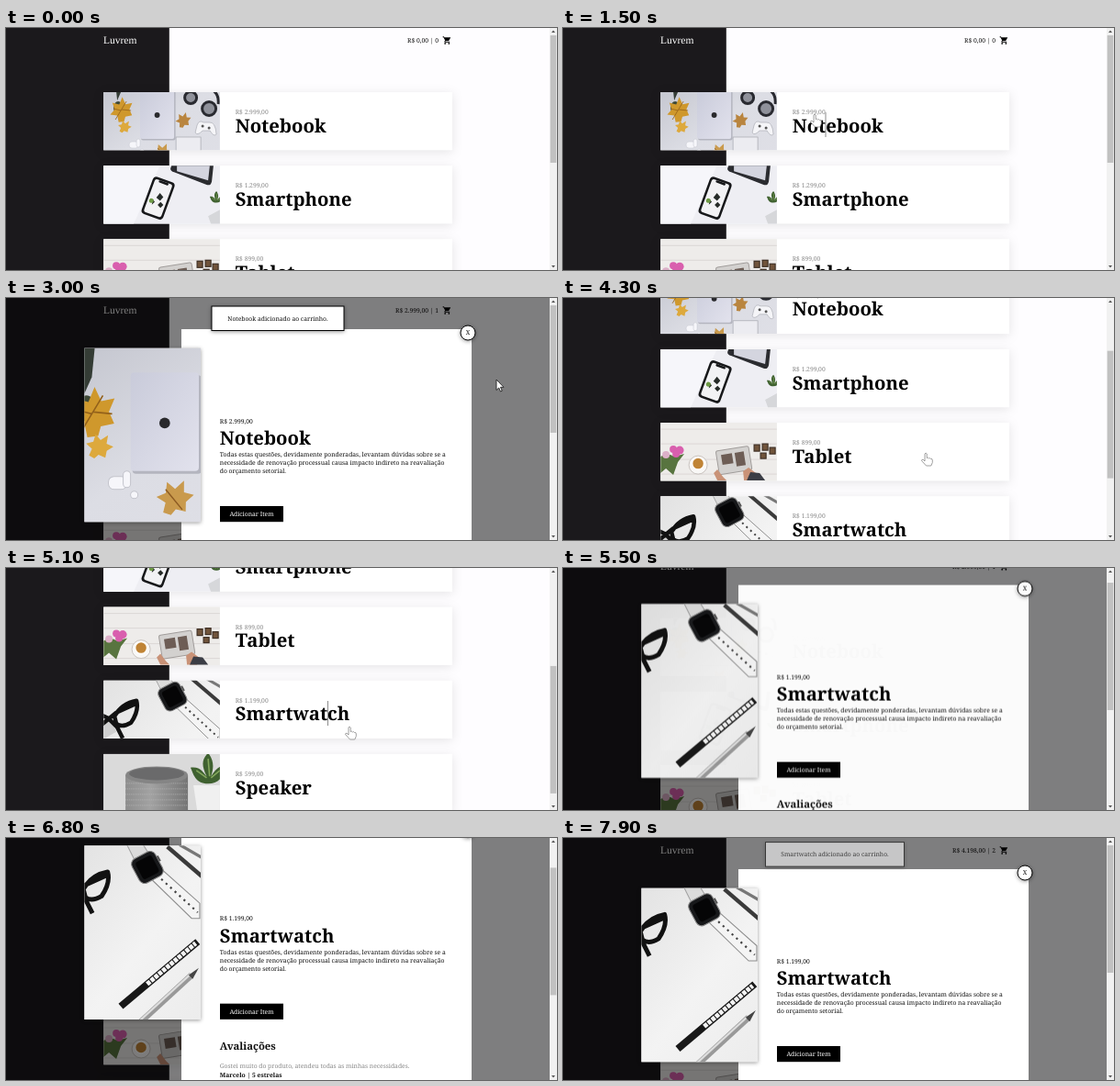
Animation of 600x264 px, one loop 8 s. Source, as an HTML page:

```html
<!DOCTYPE html>
<html lang="pt-BR">
<head>
<meta charset="utf-8">
<style>
html, body { margin: 0; width: 100%; height: 100%; overflow: hidden; background: #fefdff }
svg { display: block }
text { font: 6.75px "Noto Serif", serif; fill: #111; text-rendering: geometricPrecision; white-space: pre }
.bold { font-weight: 700 }
.title { font-size: 20.25px; font-weight: 700; fill: #000 }
.heading { font-size: 11.3px; font-weight: 700 }
.muted { fill: #888 }
.brand { font: 11.5px "Liberation Serif", serif; fill: #fff }
.middle { text-anchor: middle }
.end { text-anchor: end }
.card { filter: drop-shadow(0 2px 6px rgba(0, 0, 0, .1)) }
.raised { filter: drop-shadow(0 1.5px 2px rgba(0, 0, 0, .4)) }
</style>
</head>
<body>
<svg id="stage" width="600" height="264" viewBox="0 0 600 264">
  <defs>
    <linearGradient id="desk" x2="1" y2="1"><stop stop-color="#bcbec8"/><stop offset=".5" stop-color="#dcdde4"/><stop offset="1" stop-color="#e0e0e7"/></linearGradient>
    <linearGradient id="metal" x2="1" y2="1"><stop stop-color="#c9cbda"/><stop offset="1" stop-color="#e2e2ed"/></linearGradient>
    <linearGradient id="paper" x2="1" y2="1"><stop stop-color="#dedede"/><stop offset=".5" stop-color="#f3f3f3"/><stop offset="1" stop-color="#e8e8e8"/></linearGradient>
    <linearGradient id="cloth"><stop stop-color="#8d8d8d"/><stop offset=".4" stop-color="#a2a2a2"/><stop offset="1" stop-color="#757575"/></linearGradient>

    <path id="leaf" d="M0 12L-3 6-10 7-7 1-11-5-4-5-3-13 2-7 8-10 7-3 11 2 5 5 5 10z"/>
    <g id="plant">
      <path d="M0 9C-9 9-10 2-12-2-5-3-3 2-1 4-5-4-4-8 0-12 4-7 4-2 2 4 5-1 8-4 12-3 11 4 7 9 0 9z" fill="#3f6130"/>
      <path d="M-1 5L-8 0M1 4L0-8M2 5L8 0" stroke="#83a75c"/>
    </g>

    <g id="notebook">
      <rect x="-10" y="-30" width="160" height="120" fill="url(#desk)"/>
      <path d="M12-20h9L19 0 15 9z" fill="#343c35"/>
      <ellipse cx="16" cy="17" rx="5" ry="7" fill="#3e4937"/>
      <rect x="41" y="-1" width="37.500" height="53.500" rx="2" fill="#b4b5bf"/>
      <rect x="40" y="-2.500" width="37" height="53.500" rx="2" fill="url(#metal)"/>
      <circle cx="58.500" cy="25" r="2.900" fill="#29292c"/>
      <use href="#leaf" transform="translate(20 20) scale(1.1) rotate(15)" fill="#cf982c"/>
      <path d="M13 30L25 10M19 20l-8-2M20 19l10 1" stroke="#93611a" stroke-width=".8"/>
      <use href="#leaf" transform="translate(23 38) scale(.6) rotate(50)" fill="#dda93d"/>
      <use href="#leaf" transform="translate(64 66) scale(.82) rotate(40)" fill="#c99a4d"/>
      <path d="M59 61l9 11" stroke="#8c5a22" stroke-width=".7"/>
      <use href="#leaf" transform="translate(87 31) scale(.7) rotate(30)" fill="#b9853f"/>
      <g fill="#f6f6fa" stroke="#c3c4cc" stroke-width=".5"><rect x="28" y="54" width="10" height="7" rx="3"/><rect x="36" y="51" width="4" height="9" rx="2"/><circle cx="42" cy="64" r="2"/></g>
      <g fill="#8f919a" stroke="#292a30" stroke-width="3"><circle cx="95" cy="6" r="6.500"/><circle cx="115" cy="18" r="7.500"/><path d="M99-4Q127-8 125 13" fill="none"/></g>
      <path d="M102 36q2-6 7-3h6q7-1 8 13-3 3-7-4h-8q-6 6-8 2z" fill="#f5f5f8" stroke="#a2a3ab" stroke-width=".6"/>
      <circle cx="108" cy="37" r="1.500" fill="#555"/><circle cx="115" cy="39" r="1.500" fill="#555"/>
      <rect x="79" y="49" width="27" height="25" fill="#ececf1" stroke="#a5a6ae" stroke-width=".7"/>
    </g>

    <g id="smartphone">
      <rect x="-10" y="-30" width="160" height="120" fill="#eeeef3"/>
      <path d="M-10-30H75L30 70H-10z" fill="#f6f6fa"/>
      <path d="M78-10l42 8-2 19q-1 5-5 4L77 7q-4-1-4-4z" fill="#2b2c30"/>
      <path d="M80-10l36 8-2 18-34-10z" fill="#d4d5df"/>
      <g transform="translate(59.500 35.500) rotate(20)">
        <rect x="-12.500" y="-21.500" width="25" height="43" rx="4" fill="#17181a"/>
        <rect x="-10" y="-19" width="20" height="38" rx="2.500" fill="#f2f2f4"/>
        <rect x="-5.500" y="-19" width="11" height="2.500" rx="1" fill="#17181a"/>
        <path d="M0-6l5 3-2 5-5-2zM4 3l4 2-2 4-4-2zM-5 3l3 2-2 4z" fill="#262b28"/>
        <circle cx="-6" cy="5" r="2.500" fill="#6e9b45"/>
      </g>
      <use href="#plant" transform="translate(123 35) scale(.6)"/>
      <path d="M114 55l15-8v22h-10z" fill="#d6d7da"/>
    </g>

    <g id="tablet">
      <rect x="-10" y="-30" width="160" height="120" fill="#eeecea"/>
      <path d="M0 7H127M0 23H127M0 40H127M0 56H127" stroke="#d6d2d0" stroke-width=".8"/>
      <path d="M0 37q8-5 15 0l11-3-7 9-5 14-8-7-6 5z" fill="#58743f"/>
      <g fill="#d95fae"><circle cx="14" cy="29" r="4"/><circle cx="21" cy="30" r="4.500"/><circle cx="17" cy="34" r="4"/></g>
      <circle cx="6" cy="35" r="4" fill="#dcb0c8"/>
      <circle cx="41" cy="46" r="10" fill="#f9f8f7" stroke="#c9c3bf"/>
      <circle cx="41" cy="44.500" r="6.500" fill="#c08436" stroke="#fff" stroke-width="1.500"/>
      <g transform="translate(80 41) rotate(-9)">
        <rect x="-18" y="-13" width="36" height="26" rx="2" fill="#d3d1cf" stroke="#a19d9b"/>
        <path d="M-13-8H-1V3H-13zM2-8H12V7H2z" fill="#6d5d55"/>
      </g>
      <g fill="#71543b" stroke="#3f3025" stroke-width="1.200"><rect x="102" y="24" width="6" height="7"/><rect x="111" y="23" width="6" height="7"/><rect x="119" y="27" width="6" height="7"/><rect x="109" y="33" width="6" height="6"/></g>
      <path d="M62 63l-4-8 4-4 6 8 4 4zM91 63l-1-10 6-4 8 6-2 8z" fill="#c99277"/>
      <path d="M94 63l4-9 10 1 6 8z" fill="#3b3d45"/>
    </g>

    <g id="smartwatch">
      <rect x="-10" y="-30" width="180" height="230" fill="url(#paper)"/>
      <path d="M45-25L61-21 78 6 64 13z" fill="#dcdcdc" stroke="#a5a5a5"/>
      <path d="M79 29l11-9 37 33v15h-8z" fill="#f4f4f4" stroke="#8e8e8e"/>
      <path d="M89 29l36 33" stroke="#444" stroke-width="2" stroke-dasharray="2 4"/>
      <g transform="translate(75 17) rotate(-28)">
        <rect x="-13" y="-13" width="26" height="27" rx="6" fill="#17181a" stroke="#888"/>
        <rect x="-9" y="-9" width="18" height="19" rx="3" fill="#050506"/>
        <rect x="13" y="-5" width="2" height="6" fill="#555"/>
      </g>
      <path d="M95-3l36 31" stroke="#3a3a3a" stroke-width="4"/>
      <path d="M107-5l26 15" stroke="#777" stroke-width="3"/>
      <path d="M-4 38L8 42 14 56-4 66z" fill="#cfcfcf"/>
      <path d="M-8 35L5 41 15 51 21 63M12 39Q20 25 36 22 39 33 30 46 20 52 14 47zM36 25L14 35-3 49" fill="none" stroke="#111" stroke-width="4.500" stroke-linejoin="round"/>
      <path d="M49 155L125 91" stroke="#181818" stroke-width="7"/>
      <path d="M75 133L123 92.500" stroke="#f3f3f3" stroke-width="4.500" stroke-dasharray="4 1"/>
      <path d="M68 171L119 124" stroke="#999" stroke-width="6"/>
      <path d="M68 169L118 123" stroke="#ddd" stroke-width="2"/>
      <path d="M116 124l10-7-6 11z" fill="#444"/>
    </g>

    <g id="speaker">
      <rect x="-10" y="-30" width="160" height="120" fill="#dadada"/>
      <path d="M24 23V90H92V23z" fill="url(#cloth)"/>
      <path d="M24 32H92M24 38H92M24 44H92M24 50H92M24 56H92M24 62H92" stroke="#bbb" stroke-width=".7" stroke-dasharray="1 1"/>
      <ellipse cx="58" cy="23" rx="34" ry="9.500" fill="#858585"/>
      <ellipse cx="58" cy="21.500" rx="30" ry="7" fill="#6a6a6b"/>
      <path d="M98 34h40v34H103z" fill="#f0f0f0"/>
      <use href="#plant" transform="translate(114 18) scale(1.600)"/>
    </g>
  </defs>

  <rect width="600" height="264" fill="#fefdff"/>
  <rect width="177.800" height="264" fill="#1b191c"/>
  <g class="scrolled" id="list"></g>
  <rect id="overlay" width="592" height="264" fill="#000" opacity=".5"/>
  <g class="scrolled">
    <g id="modal"></g>
    <g id="alert">
      <rect id="alertBox" class="raised" y="9" height="26.500" fill="#fff" stroke="#000"/>
      <text id="alertText" class="middle" x="296" y="24.700"></text>
    </g>
  </g>
  <rect x="592" width="8" height="264" fill="#f1f1f1"/>
  <path d="M594 5l2-2.500 2 2.500zM594 259l2 2.500 2-2.500z" fill="#555"/>
  <rect id="thumb" x="592.700" width="6.600" height="139" fill="#c1c1c1"/>
  <rect id="caret" width="1" height="27" fill="#8c8c8c"/>
  <g id="cursor" fill="#fff" stroke-linejoin="round">
    <path id="arrow" d="M0 0V11.500L2.700 9 4.500 13 6.300 12.200 4.500 8.300H8z" stroke="#222" stroke-width=".9"/>
    <path id="hand" d="M-1 1Q0-1 1.200 1V5.500Q2.500 4.500 3.500 6 4.700 5 5.500 6.500 7.300 6 7.300 8V10.500L5.800 14H.5L-4.500 8.500Q-4.500 6.500-2.500 7.500L-1 9z" stroke="#777" stroke-width=".7"/>
  </g>
</svg>
<script>
const LOOP = 8000;
const $ = id => document.getElementById(id);
const text = (x, y, str, cls = '') => `<text x="${x}" y="${y}" class="${cls}">${str}</text>`;
const photo = (id, x, y, w, h, box) =>
  `<svg x="${x}" y="${y}" width="${w}" height="${h}" viewBox="${box}" preserveAspectRatio="xMidYMid slice"><use href="#${id}"/></svg>`;

const products = [['Notebook', '2.999'], ['Smartphone', '1.299'], ['Tablet', '899'], ['Smartwatch', '1.199'], ['Speaker', '599']];
const description = ['Todas estas questões, devidamente ponderadas, levantam dúvidas sobre se a',
  'necessidade de renovação processual causa impacto indireto na reavaliação', 'do orçamento setorial.'];
const reviews = [['Gostei muito do produto, atendeu todas as minhas necessidades.', 'Marcelo | 5 estrelas'],
  ['Gostei, mas o preço poderia ser melhor.', 'Fernanda | 4 estrelas']];
const portraits = { Notebook: '15 -16 63 95', Smartwatch: '13 -4 115 172' };

$('list').innerHTML = text(106, 16.800, 'Luvrem', 'brand') + '<text id="cart" class="end" x="471" y="16.300"></text>' +
  `<g transform="translate(475.200 8.500) scale(.42)"><path d="M1 2v2h2l4 8-2 3q0 2 2 2h12v-2H7.500l1-2h8l5-9H5.200l-1-2z"/>
   <circle cx="7" cy="20" r="2"/><circle cx="17" cy="20" r="2"/></g>` +
  products.map(([name, price], i) => {
    const y = 70 + i * 80.150;
    return `<rect class="card" x="106.300" y="${y}" width="379.700" height="63.300" fill="#fff"/>` +
      photo(name.toLowerCase(), 106.300, y, 126.600, 63.300, '0 0 127 63.300') +
      text(249.700, y + 24, `R$ ${price},00`, 'muted') + text(249.700, y + 43.700, name, 'title');
  }).join('');

function buildModal(name) {
  const price = products.find(p => p[0] === name)[1];
  return `<rect x="191" y="34" width="316" height="420" fill="#fff"/>
    <rect class="raised" x="85.400" y="54.700" width="126.600" height="189.600" fill="#ddd"/>` +
    photo(name.toLowerCase(), 85.400, 54.700, 126.600, 189.600, portraits[name]) +
    '<circle class="raised" cx="503" cy="38" r="8" fill="#fff" stroke="#000"/>' + text(503, 40.400, 'X', 'middle') +
    text(232.800, 136.700, `R$ ${price},00`) + text(232.800, 160, name, 'title') +
    description.map((line, i) => text(232.800, 173 + i * 9, line)).join('') +
    '<rect x="233" y="227" width="69" height="17.200"/>' +
    '<text class="middle" x="267.500" y="238" style="fill:#fff;font-weight:500">Adicionar Item</text>' +
    text(232.800, 277.300, 'Avaliações', 'heading') +
    reviews.map(([comment, author], i) => {
      const y = 297 + i * 37.500;
      return text(232.800, y, comment, 'muted') + text(232.800, y + 10.700, author, 'bold') +
        `<path d="M233 ${y + 21.500}H486" stroke="#e8e8e8"/>`;
    }).join('');
}

// Keyframes are [time, ...values], eased between neighbours.
const scrollKeys = [[0, 0], [3900, 0], [4250, 94.2], [4350, 94.2], [4600, 187.7], [5270, 187.7], [5550, 0],
  [5750, 0], [6150, 112], [6550, 112], [7000, 0]];
const cursorKeys = [[800, 288, 262], [1300, 274, 94], [1800, 274, 94], [2250, 267, 234], [2950, 534, 89], [3050, 534, 89],
  [3300, 556, 108], [3850, 556, 108], [4200, 395, 169], [4600, 395, 169], [5050, 374, 173]];

function track(keys, t) {
  const i = keys.findIndex(k => k[0] > t);
  if (i < 1) return keys.at(i).slice(1);
  const [a, b] = [keys[i - 1], keys[i]];
  const p = (t - a[0]) / (b[0] - a[0]), e = p * p * (3 - 2 * p);
  return a.slice(1).map((v, n) => v + (b[n + 1] - v) * e);
}

const within = (t, from, to) => t >= from && t < to;
const show = (el, on) => el.style.display = on ? '' : 'none';

function fadeDown(el, t, start, end) {
  show(el, within(t, start, end));
  const p = 1 - (1 - Math.min(1, Math.max(0, (t - start) / 300))) ** 2;
  el.setAttribute('opacity', p);
  el.setAttribute('transform', `translate(0 ${-10 * (1 - p)})`);
}

let opened;
function draw(t) {
  const second = t >= 5000;
  const name = second ? 'Smartwatch' : 'Notebook';
  if (name !== opened) {
    opened = name;
    $('modal').innerHTML = buildModal(name);
    const width = second ? 151 : 144;
    $('alertBox').setAttribute('x', 296 - width / 2);
    $('alertBox').setAttribute('width', width);
    $('alertText').textContent = `${name} adicionado ao carrinho.`;
  }
  const [start, end] = second ? [5250, LOOP] : [1660, 3800];
  fadeDown($('modal'), t, start, end);
  show($('overlay'), within(t, start, end));
  if (second) fadeDown($('alert'), t, 7800, LOOP);
  else fadeDown($('alert'), t, 2600, 3600);
  $('cart').textContent = t < 2600 ? 'R$ 0,00 | 0' : t < 7800 ? 'R$ 2.999,00 | 1' : 'R$ 4.198,00 | 2';

  const [scroll] = track(scrollKeys, t);
  document.querySelectorAll('.scrolled').forEach(g => g.setAttribute('transform', `translate(0 ${-scroll})`));
  $('thumb').setAttribute('y', 8 + scroll * .527);

  const [x, y] = track(cursorKeys, t);
  const arrow = within(t, 1660, 4000);
  $('cursor').setAttribute('transform', `translate(${x} ${y})`);
  show($('cursor'), within(t, 800, 2250) || within(t, 2950, 5250));
  show($('arrow'), arrow);
  show($('hand'), !arrow);
  show($('caret'), within(t, 1500, 1660) || within(t, 5100, 5250));
  $('caret').setAttribute('x', second ? 350 : 285.500);
  $('caret').setAttribute('y', second ? 145 : 92);
}

const began = performance.now();
function tick() {
  draw((performance.now() - began) % LOOP);
  requestAnimationFrame(tick);
}
tick();
</script>
</body>
</html>
```
